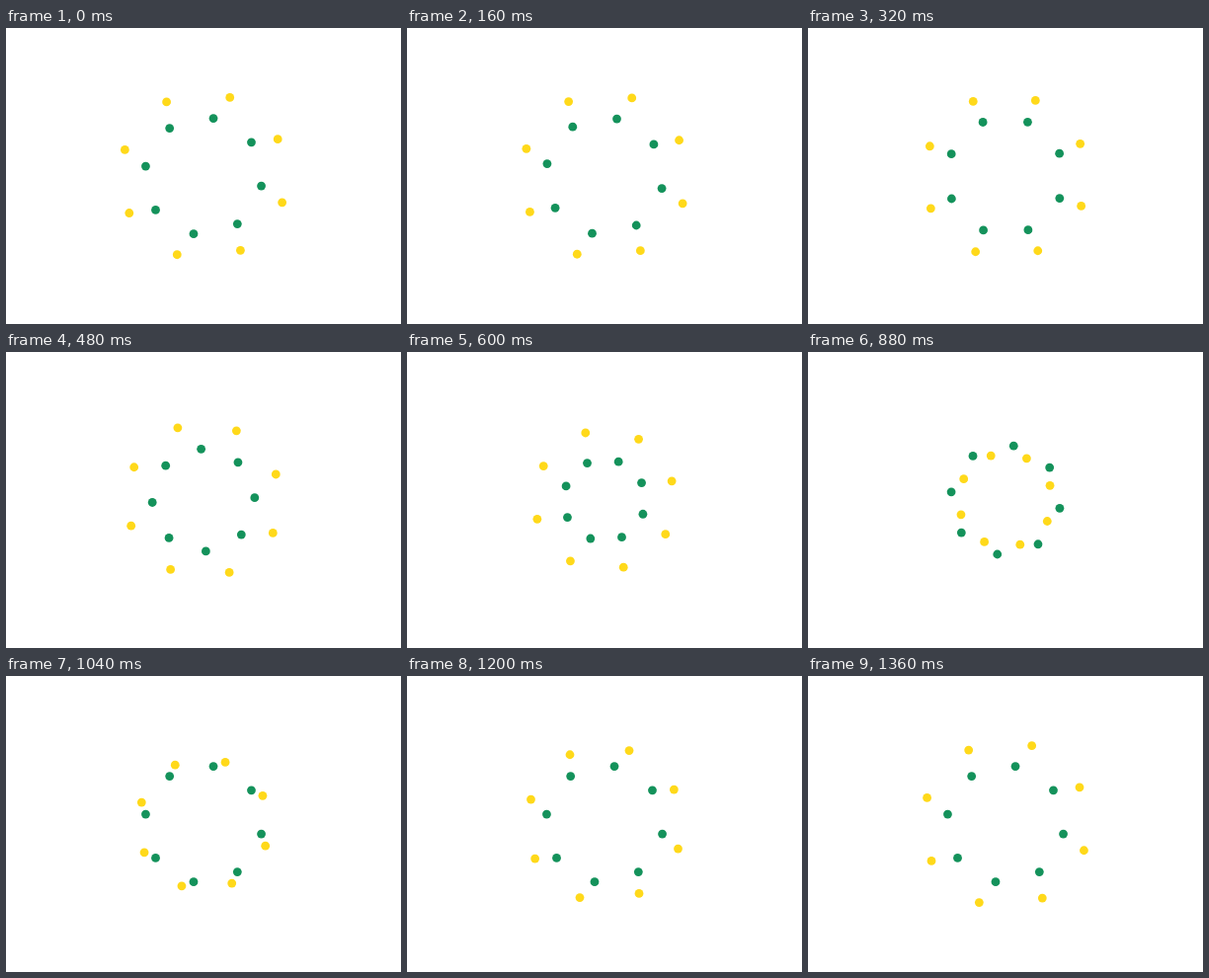
These frames come from a looping animation (400x300 px, 1.4 s). An HTML page with a canvas:

```html
<!DOCTYPE html>
<html>
<head>
<meta charset="utf-8">
<title>Dot rings</title>
<style>
  html, body { margin: 0; overflow: hidden; background: #fff; }
  canvas { display: block; width: 400px; height: 300px; }
</style>
</head>
<body>
<canvas></canvas>
<script>
const LOOP = 1400, STEP = 40, DOTS = 8, DOT_RADIUS = 4.4;

// Each ring winds up while it shrinks to half size, then springs back.
const rings = [
  {
    color: '#ffd91a', radius: 84, angle: 18.55,
    shrink: { start: 0, turn: 843, stop: 1400, power: 3.4 },
    spin: { turn: 829, stop: 1120, mid: 20.4, end: -90, powerIn: 2, powerOut: 3.78 }
  },
  {
    color: '#14925b', radius: 59.4, angle: 9.71,
    shrink: { start: 300, turn: 703, stop: 980, power: 1.7 },
    spin: { turn: 709, stop: 980, mid: 82, end: 135, powerIn: 2.36, powerOut: 3.84 }
  }
];

const canvas = document.querySelector('canvas');
const ctx = canvas.getContext('2d');
const scale = window.devicePixelRatio || 1;
canvas.width = 400 * scale;
canvas.height = 300 * scale;

const progress = (t, from, to) => Math.min(1, Math.max(0, (t - from) / (to - from)));

function radiusAt(t, { radius, shrink: s }) {
  const amount = t < s.turn
    ? progress(t, s.start, s.turn) ** s.power
    : (1 - progress(t, s.turn, s.stop)) ** 2;
  return radius * (1 - amount / 2);
}

function angleAt(t, { angle, spin: s }) {
  const turned = t < s.turn
    ? s.mid * progress(t, 0, s.turn) ** s.powerIn
    : s.end + (s.mid - s.end) * (1 - progress(t, s.turn, s.stop)) ** s.powerOut;
  return (angle + turned) * Math.PI / 180;
}

function draw(t) {
  ctx.setTransform(scale, 0, 0, scale, 0, 0);
  ctx.fillStyle = '#fff';
  ctx.fillRect(0, 0, 400, 300);
  ctx.translate(200, 150.1);
  for (const ring of rings) {
    const r = radiusAt(t, ring), start = angleAt(t, ring);
    ctx.fillStyle = ring.color;
    for (let i = 0; i < DOTS; i++) {
      const a = start + i * 2 * Math.PI / DOTS;
      ctx.beginPath();
      ctx.arc(r * Math.sin(a), -r * Math.cos(a), DOT_RADIUS, 0, 2 * Math.PI);
      ctx.fill();
    }
  }
}

const begin = performance.now();
function tick() {
  const t = (performance.now() - begin) % LOOP;
  draw(Math.floor(t / STEP) * STEP);
  requestAnimationFrame(tick);
}
tick();
</script>
</body>
</html>
```
